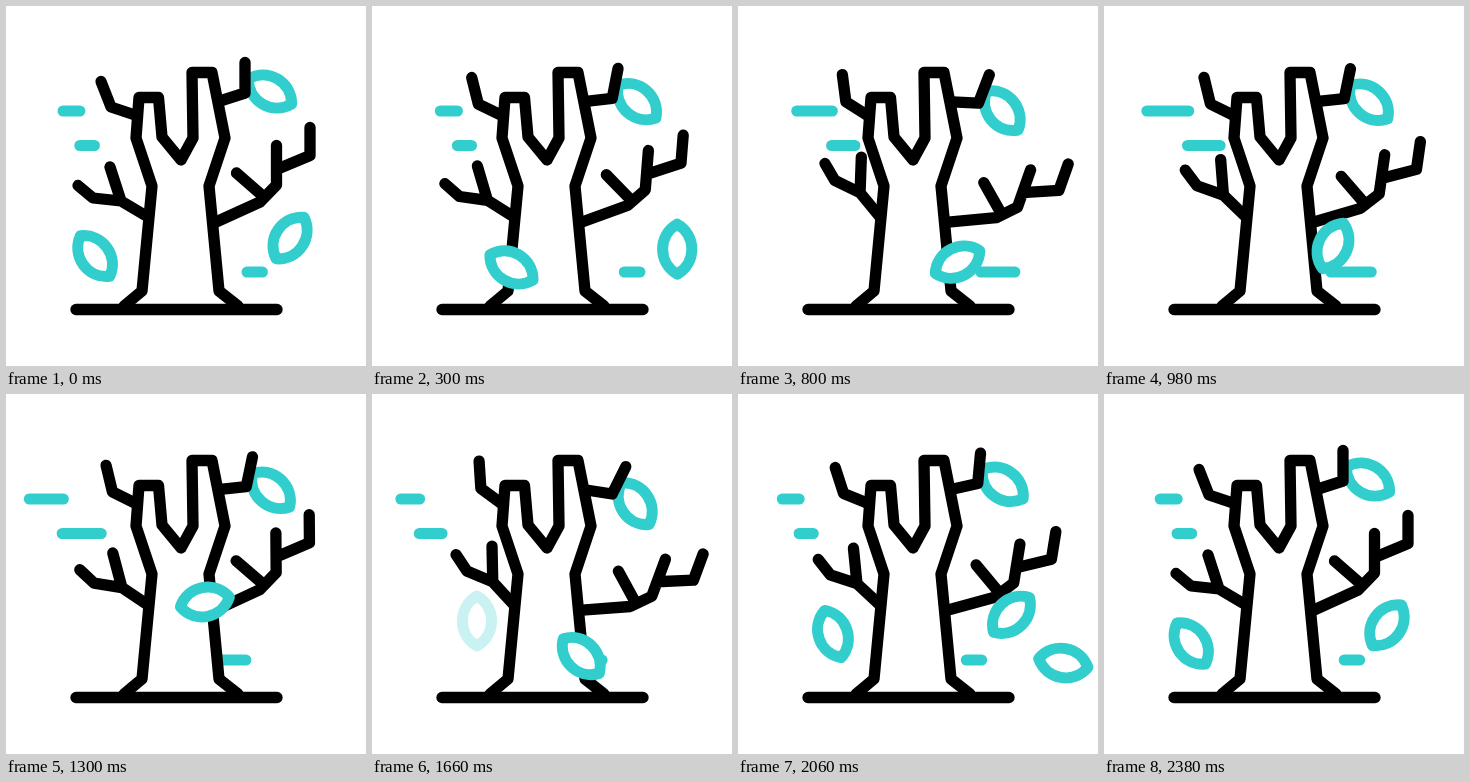
An HTML page that plays this animation: 360x360 px, repeating every 2400 ms.

```html
<!DOCTYPE html>
<html lang="en">
<head>
<meta charset="utf-8">
<title>Tree in the wind</title>
<style>
html, body { margin: 0; width: 100%; height: 100%; overflow: hidden; background: #fff; }
svg { display: block; width: 100vw; height: 100vh; }
path { fill: none; stroke: #000; stroke-width: 11.3; stroke-linecap: round; stroke-linejoin: round; }
.teal { stroke: #32cdcd; stroke-width: 11; }
.solid { fill: #fff; }
</style>
</head>
<body>
<svg viewBox="0 0 360 360">
  <defs>
    <path id="leaf" class="teal solid" d="M-25 0C-14 -19.5 14 -19.5 25 0C14 19.5 -14 19.5 -25 0Z"/>
  </defs>
  <g id="dashes"></g>
  <g id="upRight">
    <use href="#leaf" transform="translate(264 85.5) rotate(30)"/>
    <path d="M214 95L239 87V56.5"/>
  </g>
  <path id="upLeft" d="M129 109L105 101L95 75.5"/>
  <path id="lowLeft" d="M142 211L115 195L87 192L72 179.5M115 195L104 161"/>
  <path id="lowRight" d="M210 216L254 196L270.5 179V139.5M270.5 163.5L304 149.5V121.5M230.5 167L258 191"/>
  <path class="solid" d="M118 300L136 285L146 180L130 132L133 91.5H152.5L156 131L175 154L187 132L186 66.5H206L219 132L203 180L213 285L232 300"/>
  <path d="M70 303.5H271"/>
  <g id="leaves"></g>
</svg>
<script>
const LOOP = 2400, GUST = 540, TURN = 2 * Math.PI;
const $ = id => document.getElementById(id);

function add(parent, tag, attrs) {
  const el = document.createElementNS('http://www.w3.org/2000/svg', tag);
  for (const k in attrs) el.setAttribute(k, attrs[k]);
  return $(parent).appendChild(el);
}

// Two gusts: rest, peak, dip, peak, rest
function swing(t, peak, dip) {
  const s = (t - peak) / GUST + 1;
  if (s <= 0 || s >= 4) return 0;
  const levels = [0, 1, dip, 1, 0], i = Math.floor(s);
  const e = (1 - Math.cos(Math.PI * (s - i))) / 2;
  return levels[i] + (levels[i + 1] - levels[i]) * e;
}

// Drift with a quick sweep to the left around time mid and a slow return
function drift(t, mid) {
  const u = TURN * (t - mid) / LOOP;
  return -24.5 * Math.sin(u + .43 * Math.sin(u));
}

// Smooth curve through rows of [time, x, y, tilt]
function curve(keys, t) {
  const last = keys.length - 1;
  if (t <= keys[0][0]) return keys[0].slice(1);
  if (t >= keys[last][0]) return keys[last].slice(1);
  const i = keys.findIndex(k => k[0] > t) - 1;
  const p = keys[i], q = keys[i + 1];
  const o = keys[Math.max(i - 1, 0)], r = keys[Math.min(i + 2, last)];
  const d = q[0] - p[0], u = (t - p[0]) / d, w = 1 - u;
  return [1, 2, 3].map(k => {
    const m = (q[k] - o[k]) / (q[0] - o[0]) * d;
    const n = (r[k] - p[k]) / (r[0] - p[0]) * d;
    return (1 + 2 * u) * w * w * p[k] + u * w * w * m + u * u * (3 - 2 * u) * q[k] - u * u * w * n;
  });
}

const branches = [
  { id: 'upLeft', x: 128, y: 110, angle: 17.8, peak: 600, dip: .3 },
  { id: 'upRight', x: 212, y: 96, angle: 26.5, peak: 600, dip: .3 },
  { id: 'lowLeft', x: 142, y: 211, angle: 20.4, peak: 745, dip: .15 },
  { id: 'lowRight', x: 210, y: 216.5, angle: 22.2, peak: 680, dip: -.08 }
];

// left and right are the ends' mean positions; the right end trails the left
const TRAIL = 200;
const dashes = [
  { y: 105, left: 47, right: 71.5, delay: 0 },
  { y: 139.5, left: 71, right: 93, delay: 190 },
  { y: 266, left: 231, right: 254, delay: 0 }
];

const looping = [
  [-740, 105, 227, 90], [-340, 95, 240, 71], [0, 89, 250, 54], [600, 195, 267, 0],
  [980, 229, 240, -65], [1300, 199, 208, -191], [1480, 180, 230, -260],
  [1660, 209, 262, -316], [2060, 325, 269, -350], [2400, 440, 275, -360]
];
const leaving = [[-720, 269, 210, 139], [0, 284, 232, 124], [600, 345, 262, 44], [800, 430, 305, 5]];

for (const dash of dashes) dash.el = add('dashes', 'path', { class: 'teal' });

// The next leaf of each kind fades in while the last one is still flying
const leaves = [[looping, -800], [leaving, -720]].flatMap(([keys, born]) =>
  [0, LOOP].map(lag => ({ keys, born, lag, el: add('leaves', 'use', { href: '#leaf' }) })));

function draw(t) {
  for (const { id, x, y, angle, peak, dip } of branches) {
    $(id).setAttribute('transform', `rotate(${angle * swing(t, peak, dip)} ${x} ${y})`);
  }
  for (const { y, left, right, delay, el } of dashes) {
    const mid = 935 + delay;
    el.setAttribute('d', `M${left + drift(t, mid)} ${y}H${right + drift(t, mid + TRAIL)}`);
  }
  for (const { keys, born, lag, el } of leaves) {
    const age = t - lag;
    const [x, y, tilt] = curve(keys, age);
    el.setAttribute('transform', `translate(${x} ${y}) rotate(${tilt})`);
    el.setAttribute('opacity', Math.max(0, Math.min(1, (age - born) / 240)));
  }
}

const start = performance.now();
function tick() {
  draw((performance.now() - start) % LOOP);
  requestAnimationFrame(tick);
}
tick();
</script>
</body>
</html>
```
